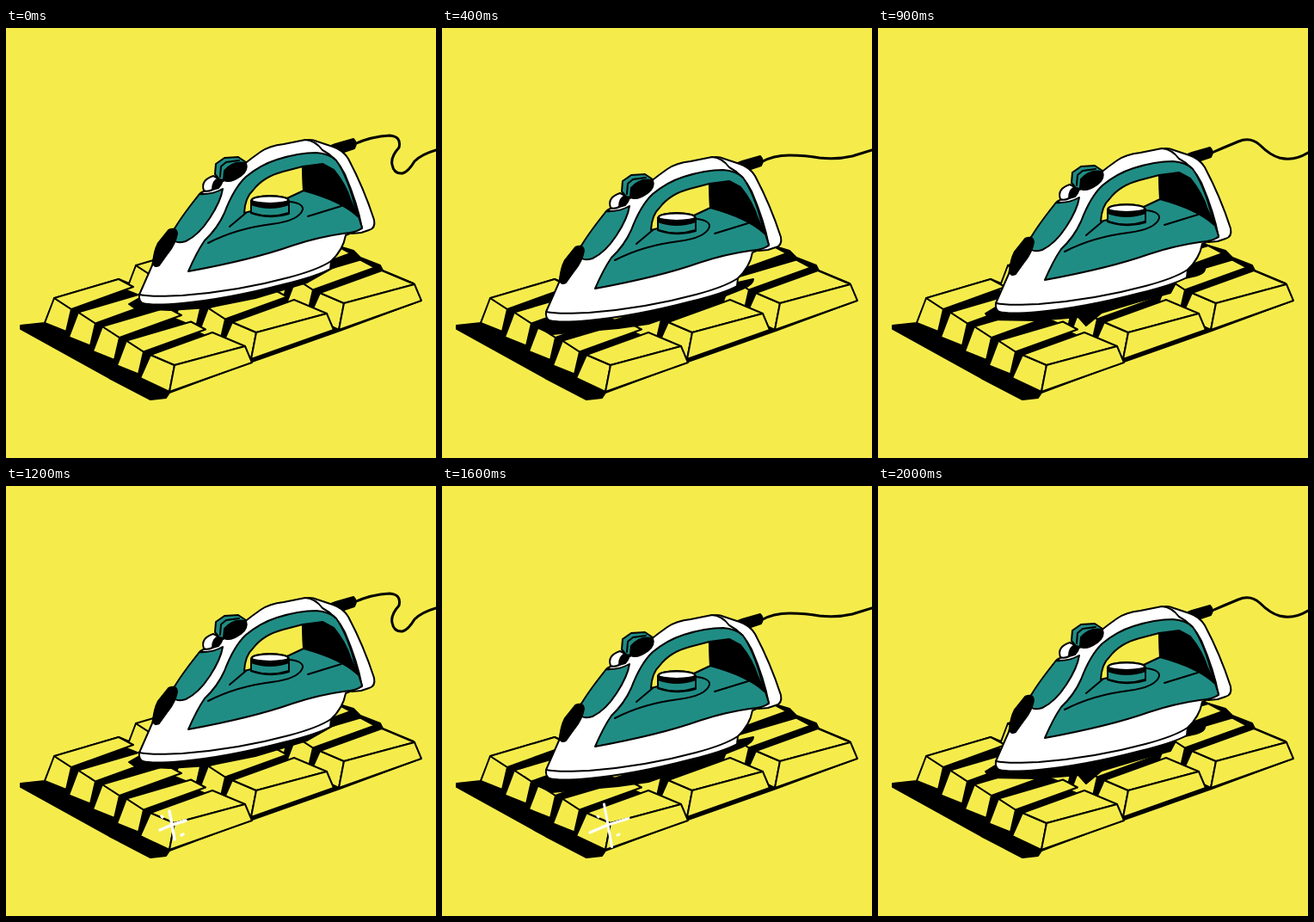
An HTML page for the animation above (2100 ms loop, 500 px wide and 500 px high).

```html
<!DOCTYPE html>
<html lang="en">
<head>
<meta charset="utf-8">
<title>Ironing a bar</title>
<style>
  html, body { margin: 0; width: 100%; height: 100%; overflow: hidden; background: #f5ec4c; }
  svg { display: block; width: 100%; height: 100%; }
  path { stroke: #000; stroke-width: 2; stroke-linejoin: round; stroke-linecap: round; fill: none; }
  .y { fill: #f5ec4c; }
  .w { fill: #fff; }
  .t { fill: #208d85; }
  .k { fill: #000; }
  #cord { stroke-width: 3; }
  #spark { stroke: #fff; }
</style>
</head>
<body>
<svg viewBox="0 0 500 500">
  <path class="k" d="M17 346L45 343L57 314L131 292L143 297L155 277L172 272L300 262L372 248L384 253L404 259L412 267L435 276L438 282L474 297L482 317L388 352L286 388L190 424L186 430L168 432L120 407L17 350Z"/>
  <g id="bar"></g>
  <path class="k" id="shade"/>
  <path id="cord"/>
  <g id="iron">
    <!-- plug and body -->
    <path class="k" d="M350 151L365 145L386 139Q391 144 387 150L369 156L359 160Z"/>
    <path class="w" d="M326 142Q335 138 344 142L362 148Q374 152 380 162Q398 196 410 233Q412 243 404 245L395 248L384 249L352 190Z"/>
    <path class="w" d="M137 320L152 286L157 265L179 242L208 202L238 186Q258 168 278 154Q288 147 305 145L330 140Q342 141 350 152Q366 160 376 180Q391 215 396 243L377 251Q374 268 360 281L359 290Q345 298 305 308Q240 325 187 330Q152 333 141 330Q136 327 137 320Z"/>
    <path d="M137 320Q150 323 187 321Q252 316 311 300Q345 291 360 281"/>
    <path class="t" d="M194 293Q204 270 213 257Q228 243 236 225Q247 196 261 183Q278 169 297 163Q322 155 343 155Q358 156 366 164Q378 181 387 214L396 242Q393 247 374 249Q345 253 315 263Q270 279 194 293Z"/>
    <path class="y" d="M259 225Q260 207 269 199Q281 183 304 177L327 171L328 199L311 207L267 223Z"/>
    <path class="k" d="M327 171L350 168L363 175Q377 192 383 211L391 229Q372 211 328 199Z"/>
    <path class="t" stroke="none" d="M267 211H311V226Q290 233 267 225Z"/>
    <path d="M267 213V225Q289 232 311 225"/>
    <path class="k" d="M267 211A22 6 0 0 1 311 211V215Q289 223 267 215Z"/>
    <path class="w" d="M268 210A21 4.500 0 0 1 310 210A21 4 0 0 1 268 210Z"/>
    <path d="M312 212Q328 214 327 221Q323 234 291 238Q250 243 217 260M333 229L372 217M261 225L242 241"/>
    <!-- front panel, notch, knob and button -->
    <path class="t" d="M176 247Q183 233 207 203Q222 204 234 197Q232 211 219 231Q206 251 191 258Q181 261 178 257Z"/>
    <path class="k" d="M153 283Q154 270 159 260L171 245Q180 241 181 249Q179 261 170 272L160 286Q154 289 153 283Z"/>
    <path class="k" d="M219 199L220 188L233 183Q235 190 229 196Z"/>
    <path class="w" d="M212 199Q208 187 223 182L229 185Q222 188 222 198Q216 201 212 199Z"/>
    <path class="t" d="M225 180L226 168L236 161L252 160L261 166L257 178L240 188L230 186Z"/>
    <path class="k" d="M235 186L236 176Q246 164 261 167Q264 175 255 182Q245 189 239 188Z"/>
    <path d="M231 183L232 171L238 166L253 164"/>
  </g>
  <path id="spark"/>
</svg>
<script>
const LOOP = 2100;
const $ = id => document.getElementById(id);
const add = (cls, d) => {
  const p = document.createElementNS("http://www.w3.org/2000/svg", "path");
  p.setAttribute("class", cls);
  p.setAttribute("d", d);
  $("bar").append(p);
};
const poly = (x, y, pts) => "M" + pts.map(p => [x + p[0], y + p[1]]).join("L") + "Z";

// Blocks stand on a skewed grid; the nearest row also shows its long side.
const columns = [[56, 314], [151, 276], [253, 242]];
const backEnd = [[0, 0], [-11, 29], [14, 39], [20, 13]];
const backTop = [[0, 0], [75, -22], [92, -13], [20, 13]];
const nearEnd = [[0, 0], [-12, 27], [22, 43], [28, 12]];
const nearTop = [[0, 0], [72, -26], [110, -10], [28, 12]];
const nearSide = [[28, 12], [110, -10], [118, 9], [22, 43]];
for (let col = 2; col >= 0; col--) {
  for (let row = col === 2 ? 2 : 0; row < 5; row++) {
    const x = columns[col][0] + 28 * row, y = columns[col][1] + 16.5 * row;
    const near = row === 4;
    add("y", poly(x, y, near ? nearEnd : backEnd));
    add("y", poly(x, y, near ? nearTop : backTop));
    if (near) add("y", poly(x, y, nearSide));
  }
}

const poses = {
  A: { at: [18, -10],
    cord: "M405 135Q425 126 446 125Q460 126 457 139Q447 150 449 159Q451 170 461 169Q468 167 475 155Q483 147 500 142",
    shade: "M143 321L157 313L200 318L300 304L379 270L398 265L399 270L380 279L350 296L290 314L235 325L190 328L150 326Z" },
  B: { at: [0, 0],
    cord: "M386 146Q402 139 419 132Q433 126 444 136Q456 148 467 151Q484 155 500 145",
    shade: "M125 332L138 324L200 328L350 288L367 276L379 275Q384 284 370 288L348 293L340 308L300 319L260 331L242 346L233 336L185 340L130 339Z" },
  C: { at: [-16, 10],
    cord: "M371 156Q385 148 404 148Q423 148 439 151Q460 153 477 149L500 142",
    shade: "M108 347L122 340L200 340L335 298L362 292Q362 298 350 303L300 323L240 344L205 349L160 353L128 356Z" },
  D: { at: [-35, 25],
    cord: "M353 170Q375 163 407 159Q460 154 500 145",
    shade: "M103 350L98 373L127 390L142 366L170 363L237 353L263 342L305 326L336 312L333 305L200 346Z" }
};

const star = s => {
  const ray = (dx, dy) => `M193 394L${193 + dx * s} ${394 + dy * s}`;
  return ray(-3, -16) + ray(3, 17) + ray(-14, 6) + ray(16, -5);
};
const dots = "M181 384L182 385M204 406L206 405";
const burst = "M190 347Q191 362 189 375M192 377L195 400M195 401Q196 420 200 440M159 405Q178 403 192 396M199 391L228 382M180 391Q182 375 201 373M178 397L184 403M204 409Q214 406 215 400";
const sparks = [
  [1100, star(0.6), 3], [1200, star(1) + dots, 3.5], [1300, star(2.3), 3],
  [1400, burst, 2.6], [1500, star(2.3), 2.3], [1600, star(1.5) + dots, 3],
  [1700, star(1) + dots, 3.5], [1800, star(0.5), 2.5], [1900, "", 0]
];
const steps = [
  [0, "A"], [200, "B"], [400, "C"], [600, "D"], [800, "C"], [900, "B"],
  [1000, "A"], [1300, "B"], [1500, "C"], [1700, "D"], [1900, "C"], [2000, "B"]
];
const pick = (table, t) => table.filter(s => s[0] <= t).pop();

function draw(t) {
  const pose = poses[pick(steps, t)[1]];
  $("iron").setAttribute("transform", `translate(${pose.at})`);
  $("cord").setAttribute("d", pose.cord);
  $("shade").setAttribute("d", pose.shade);
  const [, d, width] = pick(sparks, t) || [0, "", 0];
  $("spark").setAttribute("d", d);
  $("spark").style.strokeWidth = width;
}

const start = performance.now();
function tick() {
  draw((performance.now() - start) % LOOP);
  requestAnimationFrame(tick);
}
tick();
</script>
</body>
</html>
```
